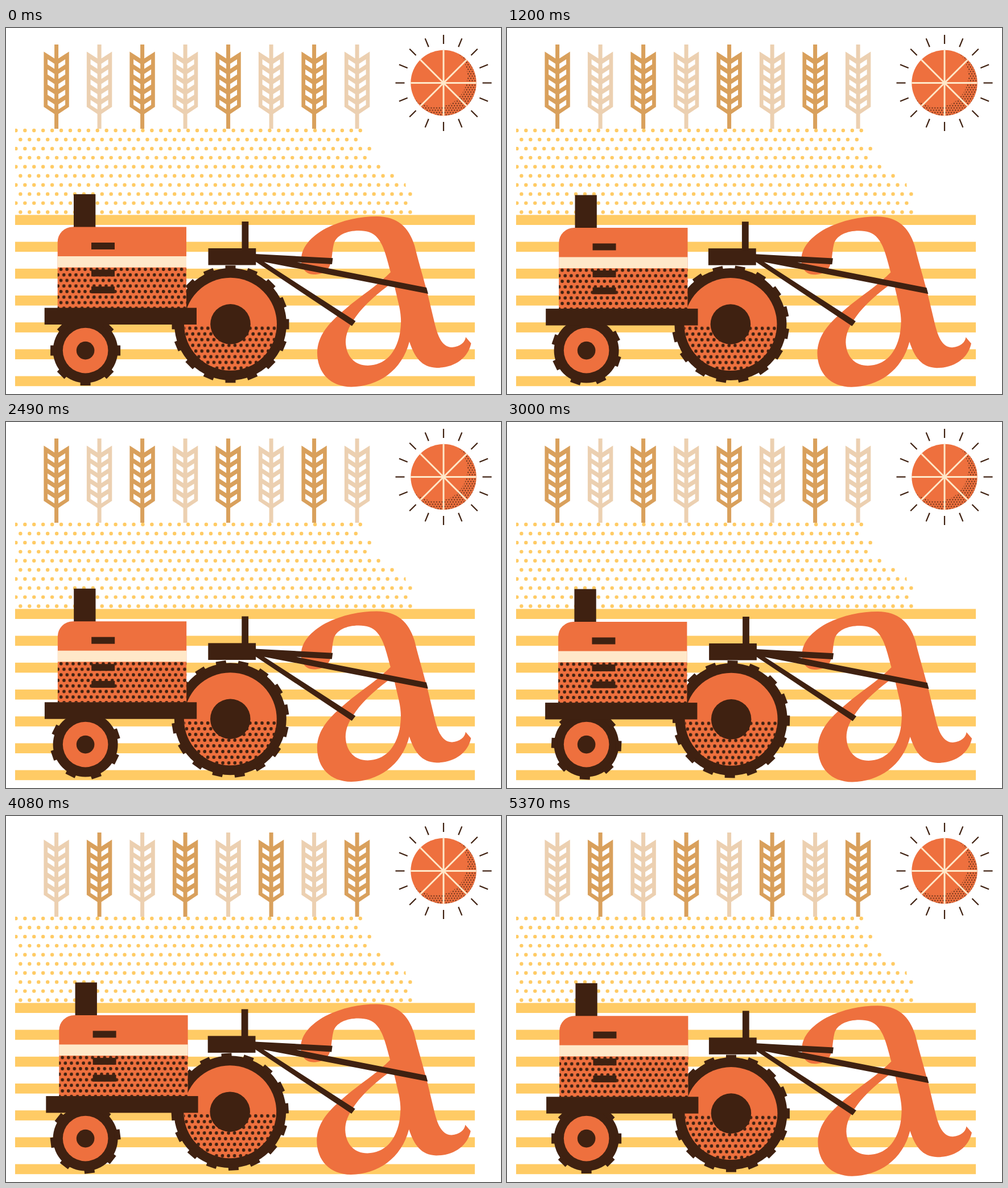
An HTML page for the animation above (5.4 s loop, 870x643 px).

```html
<!DOCTYPE html>
<html lang="en">
<head>
<meta charset="utf-8">
<title>Harvest tractor</title>
<style>
  html, body { margin: 0; width: 100%; height: 100%; overflow: hidden; background: #fff; }
  svg { display: block; width: 100vw; height: 100vh; }
</style>
</head>
<body>
<script>
const DARK = '#3f2111', ORANGE = '#ee703e', YELLOW = '#ffcb65', CREAM = '#ffe8c9';
const WHEAT = ['#d9a05c', '#ecd0b1'];

const list = (n, f) => Array.from({ length: n }, (_, i) => f(i)).join('');
const rect = (x, y, w, h, fill, more = '') =>
  `<rect x="${x}" y="${y}" width="${w}" height="${h}" fill="${fill}" ${more}/>`;
const disc = (x, y, r, fill) => `<circle cx="${x}" cy="${y}" r="${r}" fill="${fill}"/>`;
const shape = (d, fill, more = '') => `<path d="${d}" fill="${fill}" ${more}/>`;

// Staggered dots; (x, y) is the centre of one of them.
const dots = (id, x, y, dx, dy, r) =>
  `<pattern id="${id}" x="${x - dx / 4}" y="${y - dy / 2}" width="${dx}" height="${dy * 2}" patternUnits="userSpaceOnUse">
    ${disc(dx / 4, dy / 2, r, DARK)}${disc(dx * 3 / 4, dy * 3 / 2, r, DARK)}</pattern>`;

const stripes = list(7, i => rect(16, 328.4 + 47.2 * i, 808, 17.6, YELLOW));

const lastDot = [38, 37, 39, 38, 40, 41, 43, 43, 43, 43];
const field = lastDot.map((n, row) => list(n + 1, i =>
  disc(17.4 + (row % 2) * 8 + 15.93 * i, 180 + 15.95 * row, 3.2, YELLOW))).join('');

const gaps = list(5, i => {
  const y = 55 + 17.8 * i;
  return [-1, 1].map(s => `M${15.5 * s} ${y}L${3.5 * s} ${y + 7.7}v9L${15.5 * s} ${y + 9}Z`).join('');
});
const ear = 'M-22.2 41.5L-3.5 53.5V29H3.5V53.5L22.2 41.5V138.5L3.5 151V177H-3.5V151L-22.2 138.5Z' + gaps;
const wheat = list(8, i =>
  shape(ear, WHEAT[0], `class="wheat" fill-rule="evenodd" transform="translate(${88.6 + 75.5 * i})"`));

const spin = (n, r1, r2, colour, width) => list(n, i =>
  `<path d="M0 ${-r1}V${-r2}" stroke="${colour}" stroke-width="${width}" transform="rotate(${360 / n * i})"/>`);
const sun = `<g transform="translate(769 96.5)">
  ${disc(0, 0, 57.7, ORANGE)}
  <circle r="57.7" fill="url(#fine)" mask="url(#crescent)"/>
  ${spin(8, 0, 57.7, CREAM, 3)}${spin(16, 68.5, 84.5, DARK, 2.2)}</g>`;

const wheel = (id, x, y, r, lugs, rim) => `<g transform="translate(${x} ${y})">
  ${disc(0, 0, r, DARK)}<g id="${id}">${spin(lugs, r - 6, r + 4.5, DARK, 18)}</g>
  ${disc(0, 0, rim, ORANGE)}</g>`;

const letter = `M519 405C520 385 535 367 562 352C592 337 622 331 652 331C688 331 708 350 718 382
  C727 418 734 440 741 467L753 517C759 543 767 561 784 561C798 560 807 552 808 543L817.5 554
  C812 580 788 597 757 597C730 596 718 578 709 551C696 602 654 630 607 630.5
  C570 630 547 606 547 570C548 535 574 512 608 484C635 463 656 449 676 429
  C668 400 664 382 653 369C645 359 634 356 620 356C599 356 580 364 576 380
  C572 396 574 412 566 423C560 431 550 433 541 433C527 433 518 422 519 405Z
  M681 446C655 464 630 486 615 507C602 525 597 538 597 552C598 578 614 593 636 593
  C666 592 685 572 692 538C696 515 694 500 689 480Z`;

const rear = `<g id="rear">
  ${shape(letter, ORANGE, 'fill-rule="evenodd"')}
  ${wheel('bigLugs', 394.5, 520.3, 98.5, 16, 81.5)}
  ${shape('M313.5 523H475.5A81 81 0 0 1 313.5 523Z', 'url(#rim)')}
  ${disc(394.5, 520.3, 35.3, DARK)}
  ${rect(355.5, 387, 83.8, 29.5, DARK)}${rect(414.5, 340, 11.8, 50, DARK)}
  ${shape('M438 397L574.5 404.3L573 415L438 407Z M438 397L739 456L742 467L438 408Z M438 401L614.5 515L608 523.5L438 410Z', DARK)}</g>`;

const body = `<g id="body">
  ${rect(119, 292, 38.3, 60, DARK)}
  ${shape('M90.7 492V376A26.5 26.5 0 0 1 117.2 349.5H317V492Z', ORANGE)}
  ${rect(90.7, 401, 226.3, 19.6, CREAM)}
  ${rect(90.7, 420.6, 226.3, 71.4, 'url(#hood)')}
  ${[377, 424.5, 454.2].map(y => rect(150, y, 41, 12, DARK)).join('')}
  ${rect(67.7, 491.6, 267.3, 29.4, DARK)}</g>`;

document.body.innerHTML = `<svg viewBox="0 0 870 643" preserveAspectRatio="none">
  <defs>
    ${dots('fine', 0, 0, 4.8, 4, 1.1)}
    ${dots('hood', 96.5, 424, 10.6, 9.75, 2.9)}
    ${dots('rim', 323, 527.5, 10.6, 10, 2.9)}
    <mask id="crescent">${disc(0, 0, 58, '#fff')}${disc(-13, -12.5, 55, '#000')}</mask>
    <clipPath id="fieldEdge"><path d="M16 170H650L702 270L703 283H730V330H16Z"/></clipPath>
  </defs>
  ${stripes}<g clip-path="url(#fieldEdge)">${field}</g>${wheat}${sun}
  ${rear}
  ${wheel('smallLugs', 139.6, 566.6, 57, 8, 39.8)}${disc(139.6, 566.6, 15.8, DARK)}
  ${body}</svg>`;

const FRAMES = 180, STEP = 30;
// Shake: step, body x, body y, rear x, rear y.
const shake = [
  [0, 0, 0, 0, 0],
  [40, .5, 1.5, -1.6, .2],
  [66, 1, 1.5, 0, .9],
  [100, -.6, 1.5, -.4, 2],
  [120, 1.6, .8, -.9, -.3],
  [152, 1.6, 1.7, -.7, -.9],
  [179, 1.4, 1.7, -.6, 2.3],
  [180, 0, 0, 0, 0]
];

function offset(n, c) {
  const k = shake.findIndex(p => p[0] > n), a = shake[k - 1], b = shake[k];
  const span = b[0] - a[0], u = (n - a[0]) / span;
  const wobble = Math.sin(Math.PI * Math.round(span / (5 + c)) * u) * (c % 2 ? 1 : -.8);
  return a[c] + (b[c] - a[c]) * u * u * (3 - 2 * u) + wobble;
}

const find = id => document.getElementById(id);
const [bodyEl, rearEl, bigLugs, smallLugs] = ['body', 'rear', 'bigLugs', 'smallLugs'].map(find);
const ears = document.querySelectorAll('.wheat');
const set = (el, value) => el.setAttribute('transform', value);

const start = performance.now();
function draw() {
  const n = Math.floor((performance.now() - start) / STEP) % FRAMES;
  const turn = -360 * n / (FRAMES - 1);
  set(bigLugs, `rotate(${turn})`);
  set(smallLugs, `rotate(${turn * 2})`);
  set(bodyEl, `translate(${offset(n, 1)} ${offset(n, 2)})`);
  set(rearEl, `translate(${offset(n, 3)} ${offset(n, 4)})`);
  const flip = Math.floor(n / 10);
  ears.forEach((el, i) => el.setAttribute('fill', WHEAT[(i + flip) % 2]));
  requestAnimationFrame(draw);
}
draw();
</script>
</body>
</html>
```
